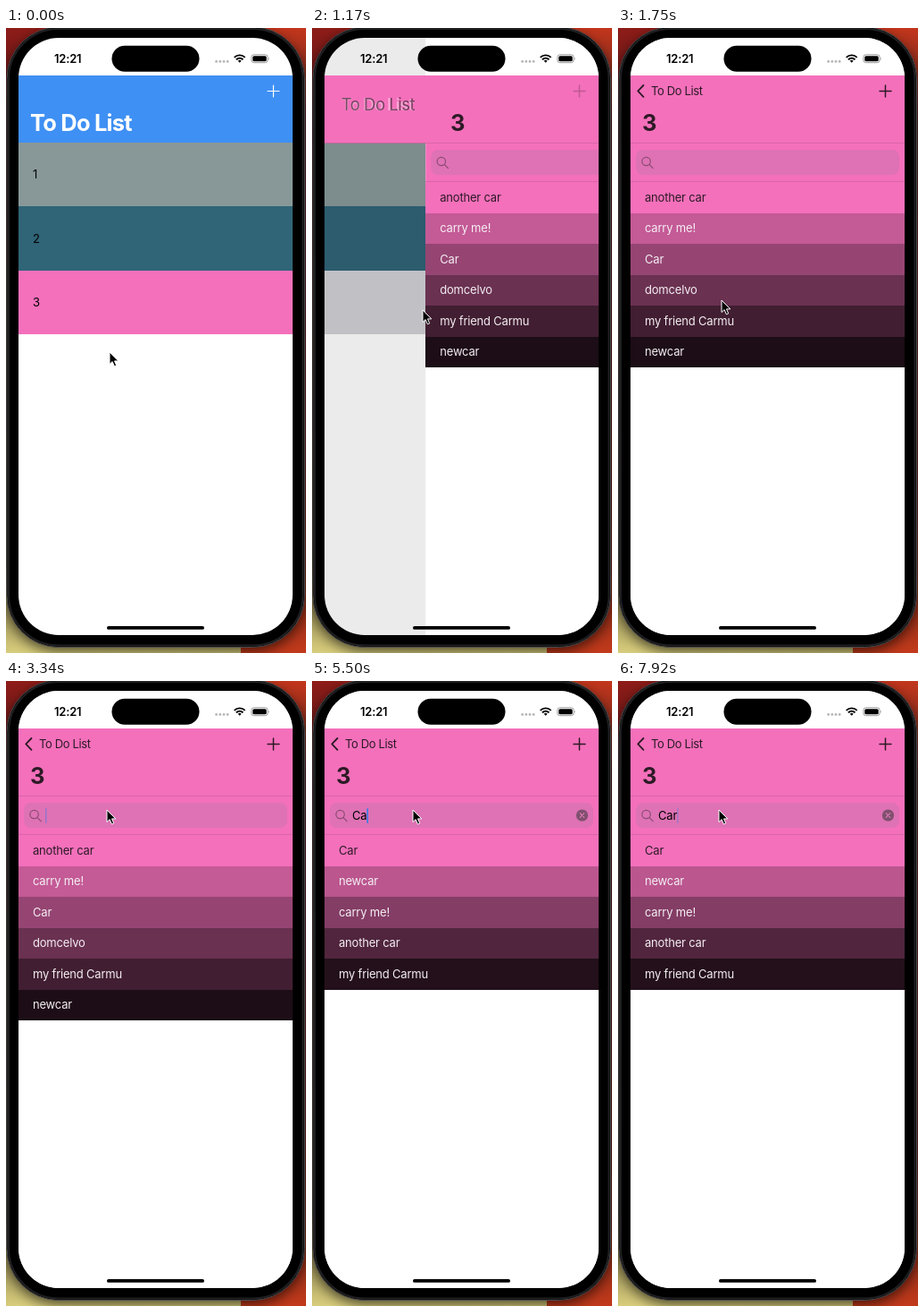
Recreate the animation shown at these times as an HTML page. Size 336 by 698 pixels, loop 8 s.

```html
<!DOCTYPE html>
<html lang="en">
<head>
<meta charset="utf-8">
<title>To Do List</title>
<style>
html, body { margin: 0; width: 100%; height: 100%; overflow: hidden; background: #000; }
svg { display: block; width: 336px; height: 698px; }
text { font-family: Inter, "Noto Sans", sans-serif; font-size: 13px; letter-spacing: -.2px; white-space: pre; }
.large { font-size: 25.5px; font-weight: 700; letter-spacing: -.8px; }
.back { letter-spacing: -.35px; }
.line { fill: none; stroke-linecap: round; stroke-linejoin: round; }
.crisp rect { shape-rendering: crispEdges; }
</style>
</head>
<body>
<svg viewBox="0 0 336 698">
  <defs>
    <clipPath id="screen"><rect x="14" y="11" width="307" height="667" rx="45"/></clipPath>
    <filter id="blur" x="-20%" y="-20%" width="140%" height="140%"><feGaussianBlur stdDeviation="7"/></filter>
    <linearGradient id="left" x2="0" y2="1">
      <stop stop-color="#8e1c18"/><stop offset=".15" stop-color="#4a1719"/>
      <stop offset=".85" stop-color="#55492f"/><stop offset="1" stop-color="#d8cd7c"/>
    </linearGradient>
    <linearGradient id="right" x2="0" y2="1">
      <stop stop-color="#c2361c"/><stop offset=".15" stop-color="#4a2220"/>
      <stop offset=".85" stop-color="#6a2418"/><stop offset="1" stop-color="#c23a1b"/>
    </linearGradient>
  </defs>

  <rect width="264" height="698" fill="url(#left)"/>
  <rect x="263" width="73" height="698" fill="url(#right)"/>
  <rect x="1" y="4" width="333.5" height="692.5" rx="58" opacity=".6" filter="url(#blur)"/>
  <rect x="1" y="-1" width="333.5" height="692.5" rx="58" stroke="#4b4a4d"/>
  <rect x="3" y="1" width="329.5" height="688.5" rx="56" stroke="#202022" stroke-width="2"/>

  <g clip-path="url(#screen)">
    <rect x="14" y="11" width="307" height="667" fill="#fff"/>
    <g id="lists" class="crisp"></g>
    <rect id="dim" x="14" y="11" width="307" height="667"/>

    <g id="detail">
      <rect x="14" y="11" width="307" height="667" fill="#fff"/>
      <rect x="14" y="128" width="307" height="44" fill="#f470bb"/>
      <rect x="20" y="136" width="295" height="28" rx="8" fill="#de72b4"/>
      <g class="line" stroke="#8b4b72" stroke-width="1.2">
        <circle cx="31.6" cy="149" r="4.7"/><path d="M35.2 152.6l4 4"/>
      </g>
      <rect x="14" y="171" width="307" height=".8" fill="#d264a3"/>
      <text id="query" x="45" y="155"></text>
      <rect id="caret" y="142" width="1.5" height="17" rx=".75" fill="#2f7bf0"/>
      <g id="clear">
        <circle cx="302.5" cy="150" r="6.6" fill="#80506f"/>
        <path class="line" d="M300.2 147.700l4.600 4.600m0-4.600l-4.600 4.600" stroke="#e27ab8" stroke-width="1.100"/>
      </g>
      <g id="items" class="crisp"></g>
    </g>

    <rect id="bar" x="14" y="53" width="307" height="75"/>
    <rect id="barLine" x="14" y="128" width="307" height=".8" fill="#d264a3"/>
    <g id="listTitle"><text class="large" fill="#fff">To Do List</text></g>
    <g id="backTitle"><text class="back" fill="#2c1a25">To Do List</text></g>
    <path id="chevron" class="line" d="M28.500 64l-6.200 6.400 6.200 6.400" stroke="#2c1a25" stroke-width="1.800"/>
    <text id="title" class="large" y="115" fill="#2c1a25">3</text>
    <path id="plusLight" class="line" d="M293 70.500h13m-6.500-6.500v13" stroke="#fff" stroke-width="1.200"/>
    <path id="plusDark" class="line" d="M293 70.500h13m-6.500-6.500v13" stroke="#2c1a25" stroke-width="1.500"/>

    <text x="54" y="38.700" font-weight="600">12:21</text>
    <g fill="#b5b5b7">
      <circle cx="235.600" cy="37.400" r="1.400"/><circle cx="239.800" cy="37.400" r="1.400"/>
      <circle cx="244" cy="37.400" r="1.400"/><circle cx="248.200" cy="37.400" r="1.400"/>
    </g>
    <g fill="none" stroke="#000" stroke-width="1.900">
      <path d="M255.700 32.900a8.500 8.500 0 0 1 12 0M257.900 35.300a5.500 5.500 0 0 1 7.600 0"/>
      <path d="M261.700 38.700l-1.900-1.900a2.700 2.700 0 0 1 3.800 0Z" fill="#000" stroke="none"/>
    </g>
    <rect x="274.900" y="29.800" width="18.200" height="8.900" rx="2.700" fill="none" stroke="#999"/>
    <rect x="276.300" y="31.200" width="15.400" height="6.100" rx="1.500"/>
    <path d="M294.300 32.700q1.600 1.500 0 3Z" fill="#999"/>
    <rect x="113" y="668" width="109" height="3.800" rx="1.900"/>
  </g>
  <rect x="118.500" y="19.700" width="98" height="29" rx="14.500"/>
  <path id="cursor" d="M0 0V13.500l3.100-2.900 2.300 5.200 2.300-1-2.200-4.900H9.800Z" stroke="#fff" stroke-linejoin="round"/>
</svg>

<script>
const LOOP = 8000, WIDTH = 307, PUSH = 1018, SELECT = 930, FOCUS = 2840;
const PINK = [244, 112, 187];
const el = id => document.getElementById(id);
const clamp = v => Math.max(0, Math.min(1, v));
const mix = (a, b, k) => a + (b - a) * k;
const ease = k => k * k * (3 - 2 * k);

const names = ["another car", "carry me!", "Car", "domcelvo", "my friend Carmu", "newcar"];
const byMatch = ["Car", "newcar", "carry me!", "another car", "my friend Carmu"];
const searches = [
  { at: 0, text: "", rows: names },
  { at: 3980, text: "C", rows: [...byMatch, "domcelvo"] },
  { at: 5250, text: "Ca", rows: byMatch },
  { at: 6400, text: "Car", rows: byMatch }
];
const pointer = [
  [0, 116, 362], [450, 116, 362], [900, 124, 315], [1300, 124, 315],
  [1650, 116, 304], [2050, 116, 304], [2700, 113, 144], [LOOP, 113, 144]
];

function set(id, attrs) {
  for (const k in attrs) el(id).setAttribute(k, attrs[k]);
}

function row(y, h, fill, label, ink) {
  return `<rect x="14" y="${y}" width="${WIDTH}" height="${h}" fill="${fill}"/>` +
    `<text x="30" y="${y + h / 2 + 4.7}" fill="${ink}">${label}</text>`;
}

function shade(i, count) {
  const k = Math.pow(1 - i / count, 1.2);
  return `rgb(${PINK.map(c => Math.round(c * k))})`;
}

el("lists").innerHTML = ["#889899", "#306477", "#f470bb"]
  .map((c, i) => row(128 + i * 71.35, 71.35, c, i + 1, "#000")).join("");
const picked = el("lists").querySelectorAll("rect")[2];

let shown = null;
function showSearch(s) {
  if (s === shown) return;
  shown = s;
  el("query").textContent = s.text;
  el("items").innerHTML = s.rows.map((name, i) =>
    row(172 + i * 34.5, 34.5, shade(i, s.rows.length), name, i ? "#f4eef2" : "#2c1a25")).join("");
}

function pushProgress(t) {
  const k = Math.max(0, t - PUSH) * 0.014;
  const p = 1 - (1 + k) * Math.exp(-k);
  return p > 0.997 ? 1 : p;
}

// Caret holds, fades out, rests, then fades back in.
function blink(ms) {
  const k = ms % 1000;
  return k < 800 ? 1 - clamp((k - 400) / 180) : clamp((k - 850) / 150);
}

function movePointer(t) {
  const i = pointer.findIndex(p => p[0] > t);
  const a = pointer[i - 1], b = pointer[i];
  const k = ease((t - a[0]) / (b[0] - a[0]));
  set("cursor", { transform: `translate(${mix(a[1], b[1], k)} ${mix(a[2], b[2], k)})` });
}

function render(t) {
  const p = pushProgress(t), off = (1 - p) * WIDTH, pushed = t >= PUSH;
  const q = Math.pow(p, 1.2);
  const at = `translate(${mix(27, 37, q)} ${mix(115, 75, q)})`;

  picked.setAttribute("fill", t >= SELECT ? "#d1d1d6" : "#f470bb");
  set("lists", { transform: `translate(${-0.3 * WIDTH * p} 0)` });
  set("dim", { opacity: 0.125 * p });
  set("detail", { transform: `translate(${off} 0)` });
  set("bar", { fill: pushed ? "#f470bb" : "#3f90f4" });
  set("barLine", { opacity: pushed ? 1 : 0 });
  set("listTitle", { transform: `${at} scale(${1 - q / 2})`, opacity: 1 - p });
  set("backTitle", { transform: `${at} scale(${2 - q})`, opacity: p });
  set("chevron", { opacity: clamp((p - 0.65) / 0.35) });
  set("title", { x: 27 + off * 1.13, opacity: pushed ? 1 : 0 });
  set("plusLight", { opacity: clamp(1 - 2 * p) });
  set("plusDark", { opacity: clamp(2 * p - 1) });

  const s = searches.filter(s => s.at <= t).pop();
  showSearch(s);
  const end = s.text ? el("query").getComputedTextLength() : -1;
  set("caret", { x: 45 + end, opacity: t < FOCUS ? 0 : blink(t - Math.max(FOCUS, s.at)) });
  set("clear", { opacity: s.text ? 1 : 0 });
  movePointer(t);
}

const start = performance.now();
function tick() {
  render((performance.now() - start) % LOOP);
  requestAnimationFrame(tick);
}
tick();
</script>
</body>
</html>
```
